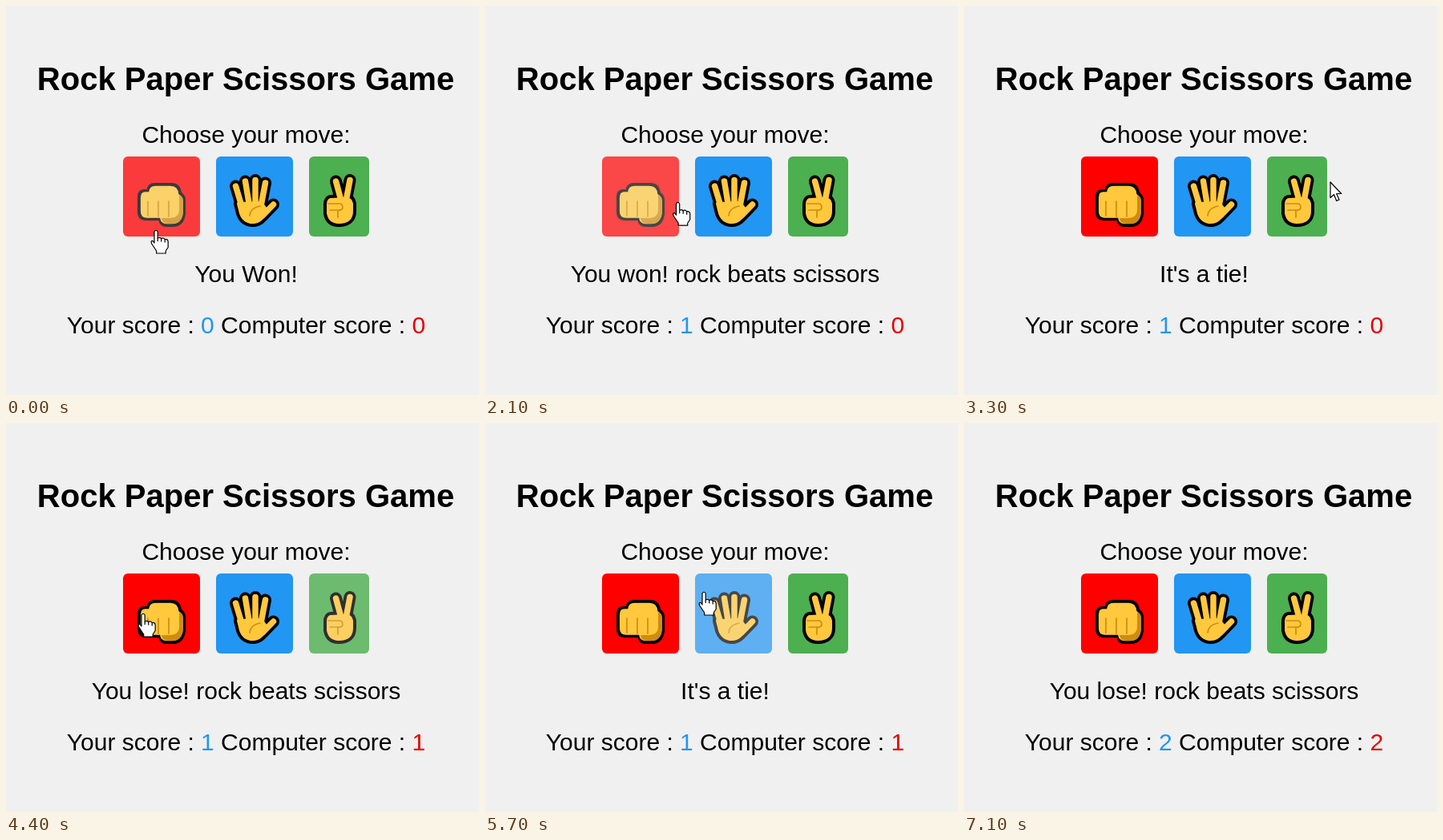
An HTML page that plays this animation: 590x486 px, repeating every 7800 ms.

```html
<!DOCTYPE html>
<html lang="en">
<head>
<meta charset="utf-8">
<title>Rock Paper Scissors Game</title>
<style>
  html, body { margin: 0; width: 100%; height: 100%; overflow: hidden; background: #f0f0f0; }
  svg { display: block; width: 590px; height: 486px; }
  text { font: 30px "Liberation Sans", Arial, sans-serif; text-anchor: middle; }
  .title { font-size: 40px; font-weight: bold; }
  .skin { fill: #ffc83d; stroke: #ffc83d; }
  .edge { fill: #000; stroke: #000; }
  .crease { fill: none; stroke: #d08c0d; stroke-width: 1.7; }
  .skin, .edge, .crease { stroke-linecap: round; stroke-linejoin: round; }
  #cursor path { fill: #fff; stroke: #000; stroke-width: 1.2; stroke-linejoin: round; }
</style>
</head>
<body>
<svg viewBox="0 0 590 486">
  <defs>
    <path id="fist" d="M172 231h5q1-8 9-8h20q10 0 11 11q5 3 5 8v18q-2 14-14 14h-7q-8 0-9-8h-17q-9 0-9-9v-18q0-8 6-8z"/>
    <path id="palm" d="M290 247L318 246L325 255Q319 270 308 270Q297 270 293 259Z"/>
    <path id="fingers" fill="none" d="M286.500 225L294 250M298.500 219L303 246M311 217.500L311 246M323.500 221L318 250M333.500 248L320 262"/>
    <path id="fold" d="M405 242Q402 243 402 248V259Q404 270 415 270Q431 270 431 256V247Q430 241 424 241Z"/>
    <path id="vee" fill="none" d="M411.500 219L418 243M429 217.500L424 244"/>
  </defs>

  <text class="title" x="299" y="105">Rock Paper Scissors Game</text>
  <text x="299.500" y="171">Choose your move:</text>

  <g class="button">
    <rect x="146" y="188" width="96" height="100" rx="6" fill="#f00"/>
    <use href="#fist" class="edge" stroke-width="4"/>
    <use href="#fist" class="skin" stroke-width="0" transform="translate(193.500 248.500) scale(.93) translate(-193.500 -248.500)"/>
    <path fill="#d08c0d" d="M216 236q5 2 5 7v16q-2 13-13 13h-6q-7 0-8-7h10q12 0 12-11z"/>
    <path class="crease" d="M177 244v18M190 244v19M203 244v19"/>
  </g>

  <g class="button">
    <rect x="262" y="188" width="96" height="100" rx="6" fill="#2196f3"/>
    <use href="#palm" class="edge" stroke-width="12"/>
    <use href="#fingers" class="edge" stroke-width="15"/>
    <use href="#palm" class="skin" stroke-width="4"/>
    <use href="#fingers" class="skin" stroke-width="7.500"/>
    <path class="crease" d="M304 262Q305 252 317 250"/>
  </g>

  <g class="button">
    <rect x="378" y="188" width="75" height="100" rx="6" fill="#4caf50"/>
    <use href="#fold" class="edge" stroke-width="12"/>
    <use href="#vee" class="edge" stroke-width="15"/>
    <use href="#fold" class="skin" stroke-width="4"/>
    <use href="#vee" class="skin" stroke-width="7.500"/>
    <path class="crease" d="M402 247H417Q420 248 420 252Q419 256 414 255H404M414 255V264"/>
  </g>

  <text id="message" x="299.500" y="345"></text>
  <text x="299.500" y="409">Your score : <tspan id="yours" fill="#2196f3"></tspan> Computer score : <tspan id="theirs" fill="#e80000"></tspan></text>

  <g id="cursor">
    <g id="hand">
      <path d="M-2 2q2-3.500 4.200 0v8q2.500-1.500 4.500.5q2.500-1.500 4.500 1q3.500-.5 4 2.500v7.500l-3 4.500v3h-11.500v-3l-6-9q-1.500-4 1.500-3.500l1.800 2.500z"/>
      <path d="M2.200 10v4M6.700 10.500v4M11.200 11.500v4"/>
    </g>
    <path id="arrow" d="M0 0v19.500l4.500-4 3.200 8 3.300-1.500-3.300-7.500h6z"/>
  </g>
</svg>
<script>
const LOOP = 7800, STEP = 100;
const GLIDE = 250, FADE = 300, POINTER_GONE = 6800;
const FIRST_CLICK = 1500, CLICK_EVERY = 1060;
const MOVES = ["rock", "paper", "scissors"];
const COMPUTER = ["scissors", "paper", "rock", "rock", "rock", "rock"];

// Where the pointer glides to, and when it sets off.
const stops = [
  { at: -GLIDE, x: 187, y: 280 },
  { at: 1150, x: 187, y: 260 },
  { at: 2000, x: 339, y: 218 },
  { at: 2600, x: 457, y: 220 },
  { at: 3400, x: 420, y: 234 },
  { at: 4150, x: 171, y: 238 },
  { at: 5100, x: 273, y: 211 },
  { at: 5900, x: 414, y: 240 }
];

const $ = id => document.getElementById(id);
const buttons = [...document.querySelectorAll(".button")];
const clamp = v => Math.min(1, Math.max(0, v));
const smooth = k => k * k * (3 - 2 * k);
const mix = (a, b, k) => a + (b - a) * k;

function pointerAt(t) {
  const i = stops.findLastIndex(stop => stop.at <= t);
  const to = stops[i], from = stops[i - 1] ?? to;
  const k = smooth(clamp((t - to.at) / GLIDE));
  return { x: mix(from.x, to.x, k), y: mix(from.y, to.y, k) };
}

function hoveredAt(t) {
  if (t >= POINTER_GONE) return -1;
  const { x, y } = pointerAt(t);
  return buttons.findIndex(button => {
    const box = button.querySelector("rect").getBBox();
    return x >= box.x && x <= box.x + box.width && y >= box.y && y <= box.y + box.height;
  });
}

// Hover fades follow the pointer's path up to the given time.
function hoverLevels(time) {
  const levels = [.83, 0, 0];
  for (let t = 0; t < time; t += STEP) {
    const hovered = hoveredAt(t);
    levels.forEach((level, i) => {
      levels[i] = clamp(level + (i === hovered ? STEP : -STEP) / FADE);
    });
  }
  return levels;
}

// The player cycles through the moves, clicking at a steady pace.
function gameAt(t) {
  const game = { message: "You Won!", yours: 0, theirs: 0 };
  COMPUTER.forEach((theirs, i) => {
    if (t < FIRST_CLICK + i * CLICK_EVERY) return;
    const yours = MOVES[i % 3];
    const lead = (MOVES.indexOf(yours) - MOVES.indexOf(theirs) + 3) % 3;
    if (lead === 0) {
      game.message = "It's a tie!";
    } else if (lead === 1) {
      game.message = `You won! ${yours} beats ${theirs}`;
      game.yours++;
    } else {
      game.message = `You lose! ${theirs} beats ${yours}`;
      game.theirs++;
    }
  });
  return game;
}

function draw(time) {
  const t = Math.floor(time / STEP) * STEP;
  for (const [id, value] of Object.entries(gameAt(t))) $(id).textContent = value;

  hoverLevels(t).forEach((level, i) => buttons[i].setAttribute("opacity", 1 - .3 * level));

  const { x, y } = pointerAt(t), onButton = hoveredAt(t) >= 0;
  $("cursor").setAttribute("transform", `translate(${x} ${y})`);
  $("cursor").style.display = t < POINTER_GONE ? "" : "none";
  $("hand").style.display = onButton ? "" : "none";
  $("arrow").style.display = onButton ? "none" : "";
}

const start = performance.now();
function tick() {
  draw((performance.now() - start) % LOOP);
  requestAnimationFrame(tick);
}
tick();
</script>
</body>
</html>
```
